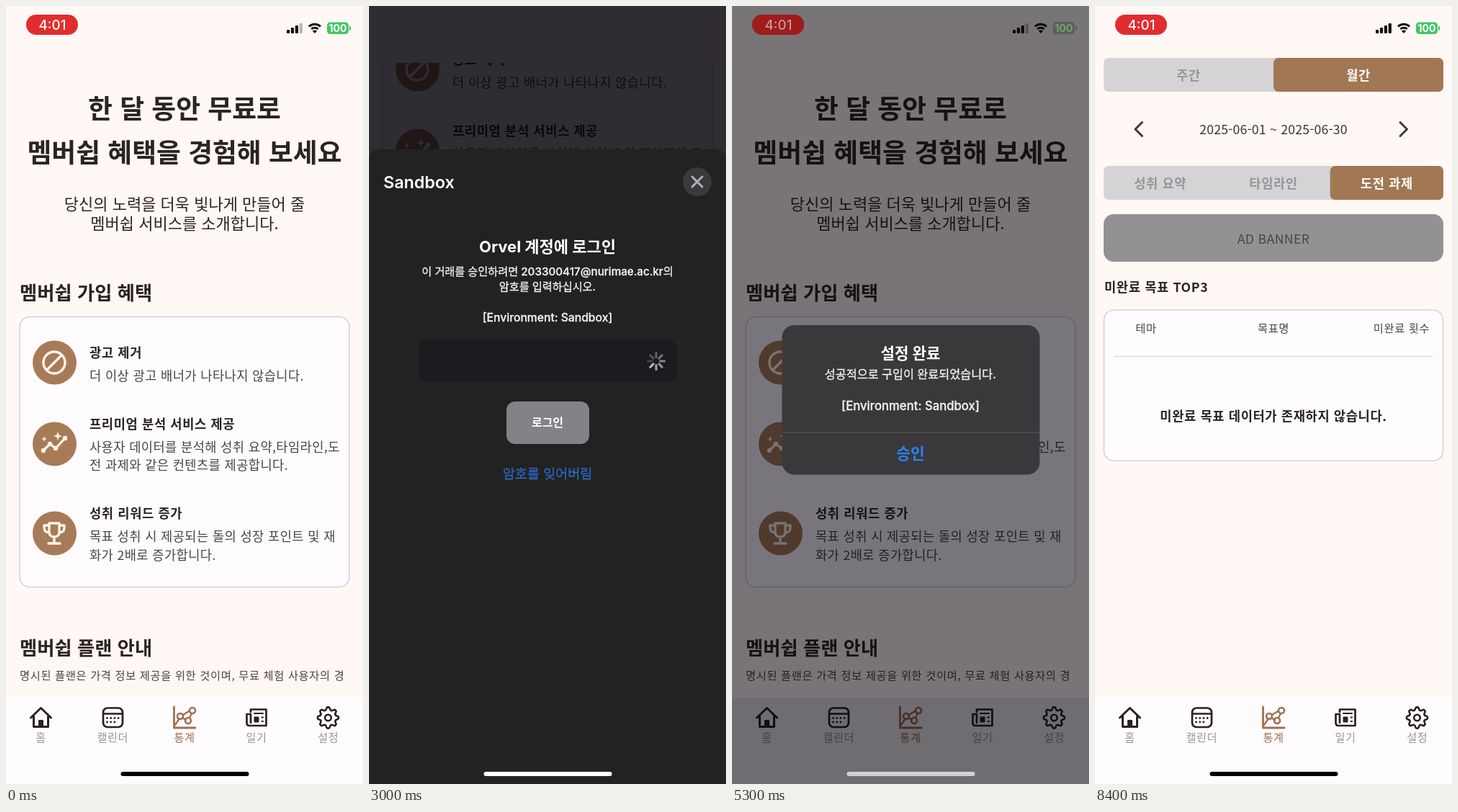
An HTML page that plays this animation: 496x1080 px, repeating every 8500 ms.

```html
<!DOCTYPE html>
<html lang="ko">
<head>
<meta charset="utf-8">
<title>멤버쉽 안내</title>
<style>
html,body{margin:0;width:100%;height:100%;overflow:hidden;background:#fff8f5}
svg{display:block;width:100vw;height:100vh}
text{font-family:'Noto Sans CJK KR','Noto Sans KR','Noto Sans CJK',sans-serif;white-space:pre}
.sys text{font-family:Inter,'Noto Sans CJK KR','Noto Sans KR','Noto Sans CJK',sans-serif}
</style>
</head>
<body>
<svg id="stage" viewBox="0 0 496 1080" preserveAspectRatio="none"></svg>
<script>
const INK = '#2a2422', SOFT = '#4a4543', BROWN = '#a27753', CARD = '#fefcff', EDGE = '#c8c4d0', BLUE = '#2f80f5';

// Text is placed by the vertical centre of its glyphs.
const text = (s, x, y, size, o = {}) =>
  `<text x="${x}" y="${y + size * .37}" font-size="${size}" font-weight="${o.w || 400}" fill="${o.c || INK}"` +
  ` letter-spacing="${o.ls || 0}" text-anchor="${o.a || 'start'}" ${o.more || ''}>${s}</text>`;
const mid = (s, x, y, size, o = {}) => text(s, x, y, size, { a: 'middle', ...o });
const body = (s, x, y, a = 'start') => text(s, x, y, 17.67, { ls: .38, c: SOFT, a });
const bold = (s, x, y, a = 'start', c = INK) => text(s, x, y, 17.67, { ls: .62, w: 700, c, a });
const small = (s, x, y, a = 'middle') => text(s, x, y, 15.3, { ls: .64, c: SOFT, a });
const heading = (s, y) => text(s, 19, y, 26.3, { w: 700 });
const rect = (x, y, w, h, r, fill, more = '') =>
  `<rect x="${x}" y="${y}" width="${w}" height="${h}" rx="${r}" fill="${fill}" ${more}/>`;
const card = (x, y, w, h) => rect(x, y, w, h, 14, CARD, `stroke="${EDGE}" stroke-width="1.2"`);
const line = (d, c, w = 3, more = '') =>
  `<path d="${d}" fill="none" stroke="${c}" stroke-width="${w}" stroke-linecap="round" stroke-linejoin="round" ${more}/>`;
const dot = (x, y, r, fill, more = '') => `<circle cx="${x}" cy="${y}" r="${r}" fill="${fill}" ${more}/>`;
const ring = (x, y, r, c, w) => dot(x, y, r, 'none', `stroke="${c}" stroke-width="${w}"`);
const group = (id, inner, more = '') => `<g id="${id}" ${more}>${inner}</g>`;

function benefits() {
  const white = '#fff5ea';
  const icons = [
    ring(67, 495, 15, white, 3.4) + line('M57 505L77 485', white, 3.4),
    line('M52 617L61 608L69 614L82 600', white, 3.2) +
      [[52, 617], [61, 608], [69, 614], [82, 600]].map(p => dot(...p, 3.2, white)).join('') +
      `<path d="M72 591l1.6 4.4 4.4 1.6-4.4 1.6-1.6 4.4-1.6-4.4-4.4-1.6 4.4-1.6zM53 597l1 3 3 1-3 1-1 3-1-3-3-1 3-1z" fill="${white}"/>`,
    line('M60 718H74V730Q74 737 67 737Q60 737 60 730ZM60 721H53V724Q53 731 60 731M74 721H81V724Q81 731 74 731M67 738V746M59 746H75', white, 3.3)
  ];
  return [495, 608, 732].map((y, i) => dot(67.5, y, 30.5, '#a87b58') + icons[i]).join('') +
    bold('광고 제거', 116, 481) +
    body('더 이상 광고 배너가 나타나지 않습니다.', 116, 513) +
    bold('프리미엄 분석 서비스 제공', 116, 580) +
    body('사용자 데이터를 분석해 성취 요약,타임라인,도', 116, 612) +
    body('전 과제와 같은 컨텐츠를 제공합니다.', 116, 637.5) +
    bold('성취 리워드 증가', 116, 704) +
    body('목표 성취 시 제공되는 돌의 성장 포인트 및 재', 116, 736) +
    body('화가 2배로 증가합니다.', 116, 762);
}

function memberPage() {
  const red = '#ea2d22';
  return mid('한 달 동안 무료로', 248, 142, 36.8, { w: 700 }) +
    mid('멤버쉽 혜택을 경험해 보세요', 248, 203, 36.8, { w: 700 }) +
    mid('당신의 노력을 더욱 빛나게 만들어 줄', 248, 275, 22) +
    mid('멤버쉽 서비스를 소개합니다.', 248, 301.5, 22) +
    heading('멤버쉽 가입 혜택', 398) +
    card(19, 431.5, 458, 375) + benefits() +
    heading('멤버쉽 플랜 안내', 891) +
    small('명시된 플랜은 가격 정보 제공을 위한 것이며, 무료 체험 사용자의 경', 19, 929, 'start') +
    small('우 어떠한 요금도 청구되지 않습니다.', 19, 949.5, 'start') +
    card(19, 998, 458, 245.5) +
    mid('멤버쉽 1개월 무료 체험권', 248, 1043.5, 22) +
    line('M31 1096.5H466', '#c9bbb9', 1.6) + dot(248, 1095.5, 13.3, '#935c40') +
    body('1개월 무료 체험 이후', 248, 1169, 'middle') +
    bold('매달', 127.5, 1198) + bold('4,500원', 166, 1198) +
    line('M167 1198.5H231', red, 2) +
    line('M237 1197.5H256M252 1193.5L256.5 1197.5L252 1201.5', red, 2.4) +
    bold('3,500원 결제', 263.5, 1198, 'start', red) +
    rect(19, 1291.5, 458, 53, 9, '#000', 'opacity=".22"') +
    rect(19, 1289, 458, 53, 9, '#9c7350') +
    bold('한 달 동안 무료 서비스 체험하기', 248, 1317, 'middle', '#fff');
}

function segments(y, labels, active) {
  const w = 472 / labels.length;
  return rect(12, y, 472, 47, 7, '#d5d3d6') + rect(12 + w * active, y, w, 47, 7, BROWN) +
    labels.map((s, i) => bold(s, 12 + w * (i + .5), y + 24.5, 'middle', i === active ? '#fff' : '#98959a')).join('');
}

const statsHead = tab => segments(72, ['주간', '월간'], 1) +
  line('M65.5 161.5L56 171L65.5 180.5', '#3f393c', 3) + line('M424 161.5L433.5 171L424 180.5', '#3f393c', 3) +
  text('2025-06-01 ~ 2025-06-30', 248, 171.5, 17.67, { ls: .2, c: '#3a3534', a: 'middle' }) +
  segments(222, ['성취 요약', '타임라인', '도전 과제'], tab) +
  rect(12, 289, 472, 66, 14, '#949194') + body('AD BANNER', 248, 323, 'middle');

const table = (title, count, y, h) => bold(title, 13, y - 32) + card(12.5, y, 471, h) +
  small('테마', 71, y + 25.5) + small('목표명', 248, y + 25.5) + small(count, 426, y + 25.5) +
  line(`M27 ${y + 64.5}H469`, '#dcd9df', 1.3);

const SHIFT = 480;
function summaryPage() {
  const names = ['건강', '정서', '학습', '재정', '관계', '여가', '기상'];
  const facts = ['목표 성취', '노력 시간', '완료한 할 일', '일기 작성', '완벽한 하루'];
  const values = ['1회', '0분', '1회', '0회', '0회'];
  const bars = names.map((s, i) => {
    const x = 55.3 + 64.1 * i, full = i === 2;
    return small(s, x, 651) + small(full ? 1 : 0, x, full ? 467 : 616) +
      (full ? rect(x - 10.5, 480, 22, 160, 5, '#34597f') : '');
  }).join('');
  const cells = facts.map((s, i) => {
    const x = 98 + 150 * (i % 3), y = i < 3 ? 780 : 888.5;
    return small(s, x, y) + bold(values[i], x, y + 44, 'middle') +
      (i < 3 ? line(`M${x - 33} 855.5H${x + 33}`, '#cfccd3', 1.6) : '');
  }).join('');
  const book = line('M70.5 1175V1154Q62 1149 53 1152V1176Q62 1173 70.5 1178Q79 1173 88 1176V1153', '#34567c', 3) +
    `<path d="M74 1157L82 1149V1166L74 1173Z" fill="#34567c"/>`;
  return statsHead(0) + bold('목표 달성 그래프', 13, 390) + card(12.5, 421.5, 471, 259) + bars +
    bold('성취 요소 요약', 13, 716) + card(12.5, 747.5, 471, 238) + cells +
    table('목표 달성 TOP3', '달성 횟수', 1053, 168) + book +
    body('아침 영어 단어 외우기', 248, 1168, 'middle') + body('1', 426, 1168, 'middle') +
    table('노력 시간 TOP3', '달성 횟수', 1288, 210) +
    bold('노력 시간 데이터가 존재하지 않습니다.', 248, 1436, 'middle');
}

const challengePage = () => statsHead(2) + table('미완료 목표 TOP3', '미완료 횟수', 422, 209.5) +
  bold('미완료 목표 데이터가 존재하지 않습니다.', 248, 569, 'middle');

function gear(cx, cy) {
  const pts = Array.from({ length: 64 }, (_, i) => {
    const a = i / 64 * Math.PI * 2, r = 12.8 + 1.9 * Math.tanh(2 * Math.cos(8 * a));
    return (cx + r * Math.cos(a)).toFixed(1) + ' ' + (cy + r * Math.sin(a)).toFixed(1);
  });
  return line('M' + pts.join('L') + 'Z', '#2a211d', 2.6) + ring(cx, cy, 4.3, '#2a211d', 2.6);
}

function nav() {
  const c = '#2a211d', b = '#a0704d';
  const dots = [0, 1, 2, 3, 4, 5, 6].map(i => dot(i < 4 ? 140.5 + i * 5.2 : 140.5 + (i - 4) * 5.2, i < 4 ? 988.5 : 994, 1.4, c)).join('');
  return rect(0, 960, 496, 120, 0, CARD) +
    line('M34.5 988L48.5 974.5L62.5 988M38.5 986V1000.5H58.5V986', c, 3) + rect(45, 991, 7, 10, 1, c) +
    rect(135, 974.5, 27, 26.5, 6, 'none', `stroke="${c}" stroke-width="2.7"`) + line('M135 982.5H162', c, 2.5) + dots +
    line('M233.5 973V1002H263', b, 2.8) + line('M235 998L241 989M245 988L250 991M255 988L258 982M246 984L254 979', b, 2.3) +
    [[242, 986], [253, 992], [259, 978]].map(p => ring(...p, 4, b, 2.6)).join('') +
    line('M340 980V976.5H361.5V999H338Q334.5 999 334.5 995V983H340V995', c, 2.7) +
    rect(344.5, 986.5, 7, 8, 1, c) + line('M345 982H357M355.5 987.5H357M355.5 993H357', c, 2.2) +
    gear(447.5, 988) +
    ['홈', '캘린더', '통계', '일기', '설정'].map((s, i) =>
      mid(s, 48.5 + i * 99.8, 1015.5, 15.2, { ls: .5, c: i === 2 ? b : '#98949a' })).join('');
}

const clock = (fill, ink) => rect(28, 12, 72, 28, 14, fill) + mid('4:01', 64.5, 26, 18.8, { w: 500, c: ink });
const battery = (fill, ink) => rect(446, 22.5, 30, 16.5, 4.5, fill) + rect(477, 28, 2, 6, 1, fill) +
  mid('100', 461, 30.8, 14, { w: 700, c: ink });

function status() {
  const bars = [5, 8, 11, 14].map((h, i) => rect(390 + i * 5.9, 38 - h, 4.2, h, 1.2, '#111', i === 3 ? 'id="bar"' : '')).join('');
  return clock('#e12d2d', '#fff') + bars +
    line('M421 28.5A11.5 11.5 0 0 1 437 28.5M424.3 32A7 7 0 0 1 433.7 32', '#111', 2.9, 'style="stroke-linecap:butt"') +
    '<path d="M429 38L425.8 34.6Q429 32.2 432.2 34.6Z" fill="#111"/>' +
    battery('#42c763', '#fff');
}

// Medium text gets a hairline outline so Hangul is as heavy as the Latin letters.
const sysMid = (s, y, size, w = 500, c = '#f4f3f4', x = 248) =>
  mid(s, x, y, size, { w, c, more: w < 700 ? `stroke="${c}" stroke-width=".3"` : '' });
const ENV = '[Environment: Sandbox]';

function sheet() {
  const spokes = Array.from({ length: 8 }, (_, i) =>
    line('M399 487.5V481.5', '#b9b8bd', 3, `class="spoke" transform="rotate(${i * 45} 399 493)"`)).join('');
  return rect(0, 199, 496, 900, 13, '#222223') +
    text('Sandbox', 20, 244.5, 23.3, { w: 600, c: '#fff' }) +
    dot(456, 244, 20, '#3a3a3d') + line('M449 237L463 251M463 237L449 251', '#b0afb5', 3) +
    sysMid('Orvel 계정에 로그인', 334, 22, 700, '#fff') +
    sysMid('이 거래를 승인하려면 203300417@nurimae.ac.kr의', 368, 15.2) +
    sysMid('암호를 입력하십시오.', 389.5, 15.2) +
    sysMid(ENV, 432.5, 15.7) +
    rect(69, 464, 359, 58, 11, '#1c1c20') + group('spin', spokes) +
    rect(191, 549, 115, 59, 12, '#858189') + sysMid('로그인', 578.5, 16, 700, '#fff') +
    sysMid('암호를 잊어버림', 649, 18.6, 500, '#2a66bd');
}

const panel = (y, h, split) => rect(69.5, y, 358, h, 17, '#3a383a') +
  line(`M70 ${split}H427`, '#5b595c', 1.2, 'style="stroke-linecap:butt"');

const offer = () => panel(421.5, 250.5, 613.5) +
  group('press', '<path d="M249 614H427.5V655Q427.5 672 410.5 672H249Z" fill="#5a575b"/>') +
  line('M248.5 614V671', '#504e51', 1.2) +
  sysMid('이 혜택은 사용할 수 없습니다.', 461, 21.1, 700, '#fff') +
  sysMid('무료 체험을 이미 이용했습니다. 멤버쉽', 489.5, 16.4) +
  sysMid('1개월 구독권 항목을 ₩3,500의 가격에', 511.5, 16.4) +
  sysMid('구입하시겠습니까?', 533, 16.4) + sysMid(ENV, 576, 16.7) +
  sysMid('취소', 643, 21.2, 500, BLUE, 158.5) + sysMid('구입', 643, 21.2, 500, BLUE, 338);

const done = () => panel(443, 207.5, 592) +
  sysMid('설정 완료', 482, 21.2, 700, '#fff') +
  sysMid('성공적으로 구입이 완료되었습니다.', 511, 16.3) + sysMid(ENV, 554.5, 16.7) +
  sysMid('승인', 621.5, 21.4, 700, BLUE);

const stage = document.getElementById('stage');
stage.innerHTML =
  `<defs><clipPath id="clipA"><rect y="79" width="496" height="861"/></clipPath>
  <clipPath id="clipB"><rect y="72" width="496" height="875"/></clipPath></defs>` +
  rect(0, 0, 496, 1080, 0, '#fff8f5') +
  group('memberView', group('member', memberPage()), 'clip-path="url(#clipA)"') +
  group('statsView', group('summary', summaryPage()) + group('challenge', challengePage()), 'clip-path="url(#clipB)"') +
  nav() + group('status', status(), 'class="sys"') +
  rect(0, 0, 496, 1080, 0, '#020008', 'id="dim"') + rect(0, 960, 496, 120, 0, '#000', 'id="navDim"') +
  group('dimStatus', clock('#a01b1c', '#bc9b98') + battery('#586259', '#76a277'), 'class="sys"') +
  group('sheet', sheet(), 'class="sys"') + group('offer', offer(), 'class="sys"') + group('done', done(), 'class="sys"') +
  rect(159.5, 1063, 178, 6, 3, '#000', 'id="homeBar"');

const el = {};
stage.querySelectorAll('[id]').forEach(n => el[n.id] = n);
const spokes = [...stage.querySelectorAll('.spoke')];

const LOOP = 8500;
const ramp = (t, a, b) => {
  const k = Math.min(1, Math.max(0, (t - a) / (b - a)));
  return k * k * (3 - 2 * k);
};
const show = (n, o) => { n.style.display = o > 0 ? '' : 'none'; n.setAttribute('opacity', o); };
const slide = (n, y) => n.setAttribute('transform', `translate(0 ${y})`);

function popup(n, t, a, b) {
  const k = ramp(t, a, a + 200), s = 1.12 - .12 * k;
  show(n, k * (1 - ramp(t, b, b + 170)));
  n.setAttribute('transform', `translate(248 547) scale(${s}) translate(-248 -547)`);
}

function draw(t) {
  const stats = t >= 5750, challenge = t >= 7500;
  show(el.memberView, stats ? 0 : 1);
  show(el.statsView, stats ? 1 : 0);
  slide(el.member, t < 3950 ? -407 * ramp(t, 500, 1350) : 0);
  show(el.summary, challenge ? 0 : 1);
  show(el.challenge, challenge ? 1 : 0);
  slide(el.summary, -SHIFT * (ramp(t, 5900, 6380) - ramp(t, 6650, 7200)));
  el.bar.setAttribute('fill', stats ? '#111' : '#b9b5b4');

  const dark = ramp(t, 1650, 1900) - ramp(t, 3700, 4000);
  const alert = ramp(t, 3700, 4000) - ramp(t, 5520, 5750);
  show(el.dim, .82 * dark + .53 * alert);
  show(el.navDim, .08 * alert);
  show(el.status, 1 - dark);
  show(el.dimStatus, alert);

  const up = ramp(t, 2100, 2600) - ramp(t, 3700, 4000);
  show(el.sheet, up > 0 ? 1 : 0);
  slide(el.sheet, 881 * (1 - up));
  const step = Math.floor(t / 100);
  show(el.spin, t >= 2750 ? 1 : 0);
  spokes.forEach((n, i) => n.setAttribute('opacity', .25 + .75 * ((i - step + 800) % 8) / 7));

  popup(el.offer, t, 4080, 4720);
  show(el.press, t >= 4500 ? 1 : 0);
  popup(el.done, t, 4930, 5500);
  el.homeBar.setAttribute('fill', dark > .5 ? '#fff' : alert > .5 ? '#d2d0d0' : '#000');
}

const start = performance.now();
function tick() {
  draw((performance.now() - start) % LOOP);
  requestAnimationFrame(tick);
}
draw(0);
tick();
</script>
</body>
</html>
```
